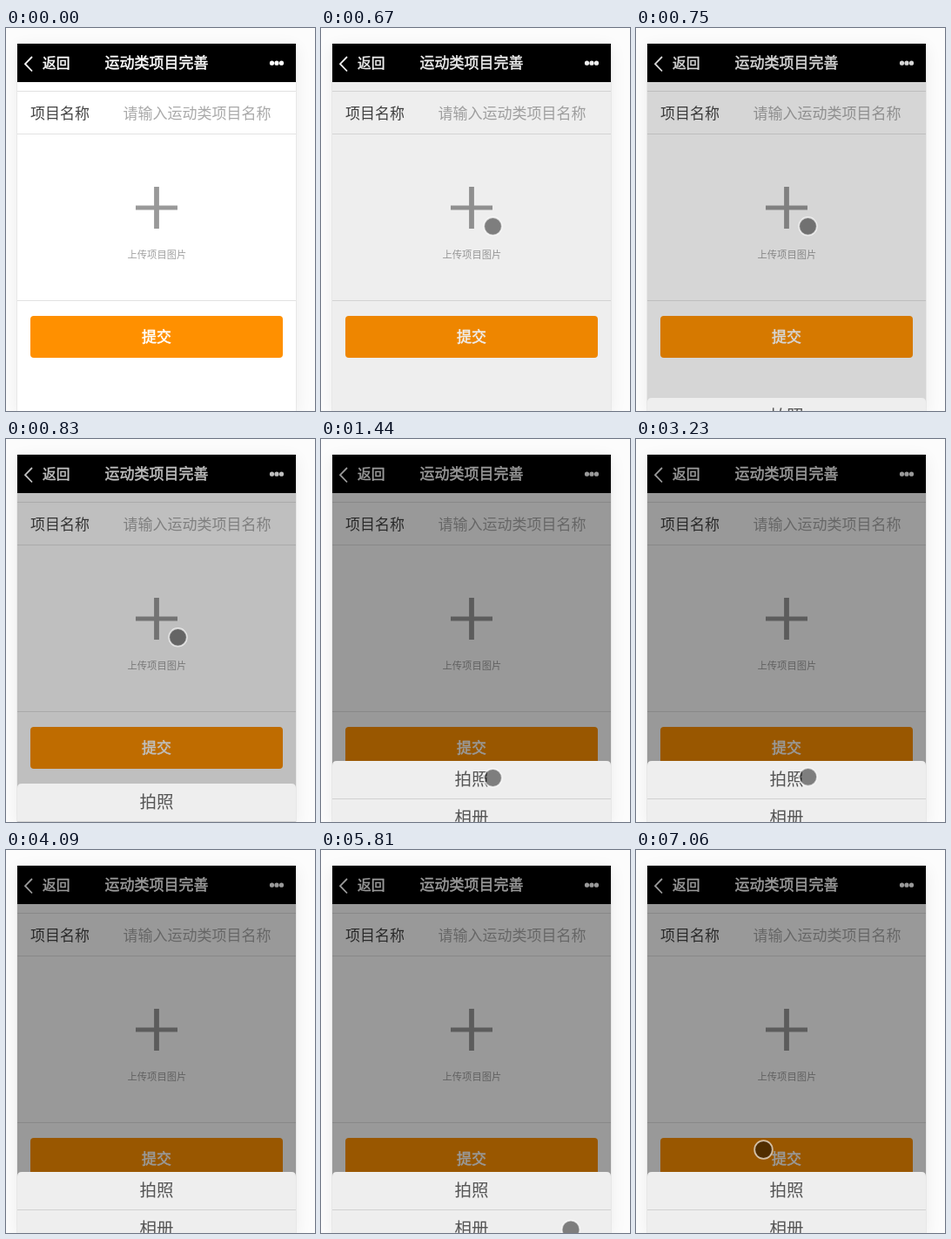
Animation, 355 px wide and 439 px high, one loop 7.99 s. Source, as an HTML page:

```html
<!DOCTYPE html>
<html lang="zh-CN">
<head>
<meta charset="utf-8">
<style>
  html, body { margin: 0; width: 100%; height: 100%; overflow: hidden; background: #fcfcfc; }
  .phone { position: absolute; left: 13px; top: 18px; width: 320px; bottom: 0;
           background: #fff; box-shadow: 0 0 1px rgba(0,0,0,.3), 0 4px 18px rgba(0,0,0,.07); }
  svg { position: absolute; left: 0; top: 0; width: 100%; height: 100%; overflow: hidden; }
  text { font-family: "Noto Sans CJK SC", "Noto Sans CJK", sans-serif; font-size: 17px; }
  .mid { text-anchor: middle; }
  .medium { fill: #fff; stroke: #fff; stroke-width: .5px; }
  .back { font-size: 15.7px; }
  .hint { font-size: 11.3px; fill: #a0a0a0; }
  .row { font-size: 19.5px; fill: #555; }
</style>
</head>
<body>
<div class="phone"></div>
<svg>
  <path d="M13 18h320v44h-320z"/>
  <path d="M30 33l-8 8.2 8 8.3" fill="none" stroke="#fff" stroke-width="1.8"/>
  <text class="medium back" x="42" y="46.3">返回</text>
  <text class="medium mid" x="173" y="46.3">运动类项目完善</text>
  <path d="M305.5 40.2h11.1" stroke="#fff" stroke-width="5.2" stroke-linecap="round" stroke-dasharray="0 5.5"/>

  <path d="M13 72.5h320M13 121.5h320M13 312.5h320" stroke="#e2e2e2"/>
  <text x="28" y="104.3" fill="#444">项目名称</text>
  <text x="134.5" y="104.3" fill="#a9a9a9">请输入运动类项目名称</text>
  <g stroke="#999">
    <path d="M149 206h48" stroke-width="5"/>
    <path d="M173 182v48" stroke-width="5.8"/>
  </g>
  <text class="hint mid" x="173.4" y="263.5">上传项目图片</text>
  <rect x="28" y="330" width="290" height="48" rx="4" fill="#ff9000"/>
  <text class="medium mid" x="173" y="360.3">提交</text>

  <rect id="shade" x="13" y="18" width="320" height="421"/>
  <g id="sheet">
    <path d="M13 200V5q0-5 5-5h310q5 0 5 5v195z" fill="#eee"/>
    <path id="pressed" d="M13 43V5q0-5 5-5h310q5 0 5 5v38z" fill="#dcdcdc"/>
    <path d="M13 43.5h320" stroke="#d2d2d2"/>
    <text class="row mid" x="173" y="28.3">拍照</text>
    <text class="row mid" x="173" y="72.3">相册</text>
  </g>
  <circle id="cursor" r="10.3" fill-opacity=".47" stroke="#fff" stroke-opacity=".65" stroke-width="1.8"/>
</svg>
<script>
const LOOP = 7990, FRAME = 77;
const SHEET_START = 670, SHEET_TOP = 369, SHEET_TRAVEL = 126;
const [shade, sheet, pressed, cursor] =
  ['shade', 'sheet', 'pressed', 'cursor'].map(id => document.getElementById(id));

const plus = { x: 197.5, y: 227.3 }, photo = { x: 197.5, y: 388.5 };
const pressPoint = { x: 186, y: 395 }, sheetEdge = { x: 200.5, y: 346 };

// Each glide starts where the last one ended, unless it has its own "from".
// "bow" bends the path sideways; "leaves" hides the cursor at the end.
const glides = [
  { start: 120, steps: 6, from: { x: 287, y: 440 }, to: plus },
  { start: 1130, steps: 5, to: photo },
  { start: 1510, steps: 9, to: pressPoint, bow: { x: 0, y: 40 } },
  { start: 3160, steps: 4, to: sheetEdge, bow: { x: 20, y: 0 } },
  { start: 3700, steps: 1, to: { x: 200.5, y: 352.5 } },
  { start: 3850, steps: 3, to: { x: 223, y: 370 }, leaves: true },
  { start: 5730, steps: 2, from: { x: 240, y: 428 }, to: { x: 287, y: 435 }, leaves: true },
  { start: 6660, steps: 6, from: { x: 255, y: 431 }, to: { x: 146.5, y: 343.5 } }
];

const clamp = p => Math.max(0, Math.min(1, p));
const smooth = p => p * p * (3 - 2 * p);
const wholeFrames = time => Math.floor(time / FRAME);

function cursorAt(t) {
  const i = glides.findLastIndex(glide => t >= glide.start);
  if (i < 0) return null;
  const { start, steps, to, leaves, from = glides[i - 1].to, bow = { x: 0, y: 0 } } = glides[i];
  const step = wholeFrames(t - start) + 1;
  if (leaves && step > steps) return null;
  const p = smooth(clamp(step / steps));
  const along = axis => from[axis] + (to[axis] - from[axis]) * p + bow[axis] * Math.sin(Math.PI * p);
  return { x: along('x'), y: along('y') };
}

function draw(t) {
  const sheetTime = wholeFrames(t - SHEET_START) * FRAME;
  const p = sheetTime < 0 ? 0 : clamp((sheetTime + 58) / 340);
  const top = Math.round(SHEET_TOP + SHEET_TRAVEL * (1 - p) ** 1.63);
  shade.setAttribute('opacity', 0.4 * p);
  sheet.setAttribute('transform', `translate(0 ${top})`);
  pressed.style.display = t >= 2300 && t < 2450 ? '' : 'none';

  const pos = cursorAt(t);
  cursor.style.display = pos ? '' : 'none';
  if (pos) cursor.setAttribute('transform', `translate(${pos.x} ${pos.y})`);
}

const begin = performance.now();
function tick() {
  draw((performance.now() - begin) % LOOP);
  requestAnimationFrame(tick);
}
tick();
</script>
</body>
</html>
```
